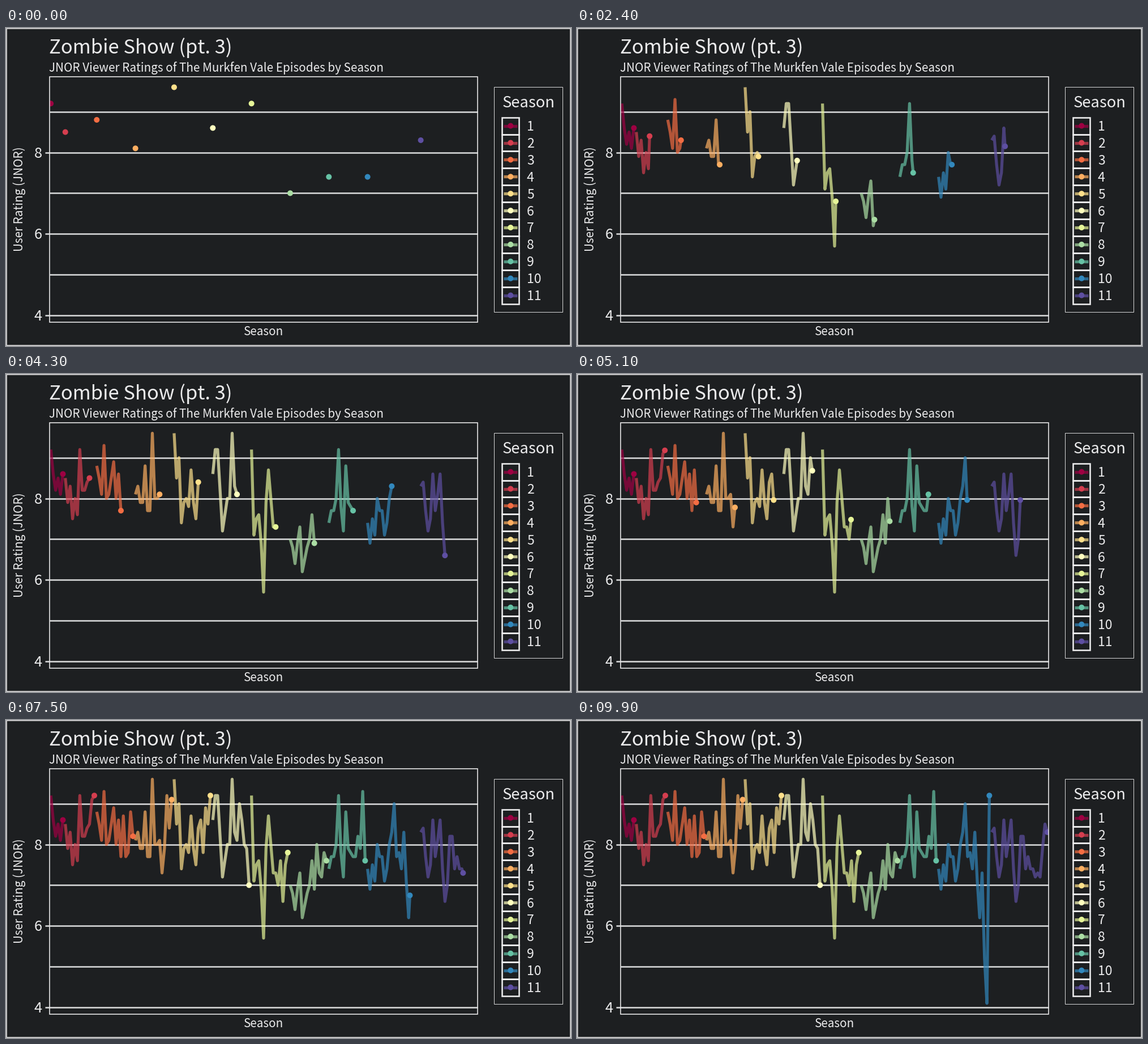
Recreate the animation shown at these times as a matplotlib script. Size 998 by 561 pixels, loop 10000 ms.

```python
import numpy as np
import matplotlib.pyplot as plt
from matplotlib.animation import FuncAnimation
from matplotlib.patches import Circle, Rectangle

W, H, DPI = 998, 561, 64
FRAMES, INTERVAL = 100, 100
BG, INK, GRID = "#1d1f21", "#ebebec", "#d6d7d8"
LEFT, TOP, RIGHT, BOTTOM = 77, 85.5, 833, 518.5
EPISODES = 177
LONGEST = 24
LINE_W, DOT_R, ALPHA = 5.2, 5, 0.7

plt.rcParams["font.family"] = ["Noto Sans CJK JP", "DejaVu Sans"]


def pt(px):
    return px * 72 / DPI


def x_pos(episode):
    return LEFT + (episode + 0.5) * (RIGHT - LEFT) / EPISODES


def y_pos(rating):
    return 219.5 + (8 - rating) * 71.87


fig = plt.figure(figsize=(W / DPI, H / DPI), dpi=DPI, facecolor=BG)
ax = fig.add_axes([0, 0, 1, 1])
ax.set_xlim(0, W)
ax.set_ylim(H, 0)
ax.axis("off")


def box(x0, y0, x1, y1, width, z=5):
    ax.add_patch(Rectangle((x0, y0), x1 - x0, y1 - y0, fill=False, ec=INK,
                           lw=pt(width), zorder=z, joinstyle="miter"))


def stroke(xs, ys, color, width, z, **kw):
    return ax.plot(xs, ys, color=color, lw=pt(width), zorder=z,
                   solid_capstyle="butt", solid_joinstyle="round", **kw)[0]


def dot(x, y, color):
    return ax.add_patch(Circle((x, y), DOT_R, fc=color, lw=0, zorder=4))


def label(x, y, text, size, **kw):
    ax.text(x, y, text, size=pt(size), color=INK, va="baseline", **kw)


# Panel
panel = Rectangle((LEFT, TOP), RIGHT - LEFT, BOTTOM - TOP,
                  transform=ax.transData)
for rating in range(4, 10):
    y = y_pos(rating)
    stroke([LEFT, RIGHT], [y, y], GRID, 2.6, 1)
    if rating % 2 == 0:
        stroke([69.5, LEFT], [y, y], GRID, 2.6, 1)
        label(64, y + 9, str(rating), 25.5, ha="right")
box(LEFT, TOP, RIGHT, BOTTOM, 1.6)
box(0.5, 0.5, W - 0.8, H - 0.8, 1.6)

# Titles
label(76.5, 45, "Zombie Show (pt. 3)", 34.6)
label(76.5, 76.5, "JNOR Viewer Ratings of The Murkfen Vale Episodes by Season",
      20.7)
label(455, 542, "Season", 20.6, ha="center")
label(30, 302, "User Rating (JNOR)", 20.7, ha="center", rotation=90,
      rotation_mode="anchor")

# Legend
box(862, 103.5, 983.5, 501, 0.9)
label(876.5, 140, "Season", 27.4)

seasons = []


def season(color, *ratings):
    """Add one season: its curve, its moving dot and its legend key."""
    start = sum(len(s["x"]) for s in seasons)
    xs = x_pos(start + np.arange(len(ratings)))
    ys = y_pos(np.array(ratings))
    line = stroke([], [], color, LINE_W, 3, alpha=ALPHA)
    head = dot(xs[0], ys[0], color)
    for artist in (line, head):
        artist.set_clip_path(panel)

    row = len(seasons)
    cy = 172.6 + 29.9 * row
    box(876.3, cy - 14.95, 906.4, cy + 14.95, 2.6, z=2)
    stroke([879.3, 903.4], [cy, cy], color, LINE_W, 3, alpha=ALPHA)
    dot(891.3, cy, color)
    label(920, cy + 8.4, str(row + 1), 23)
    seasons.append(dict(x=xs, y=ys, line=line, head=head))


season("#9E0142", 9.2, 8.6, 8.2, 8.5, 8.1, 8.6)
season("#D53E4F", 8.5, 7.9, 8.3, 7.5, 8.0, 7.6, 9.2, 8.2, 8.2, 8.4, 8.5,
       9.1, 9.2)
season("#F46D43", 8.8, 8.5, 8.1, 9.3, 8.0, 8.1, 8.5, 8.9, 8.0, 8.6, 7.7,
       8.7, 7.7, 7.8, 8.8, 8.2)
season("#FDAE61", 8.1, 8.3, 7.9, 7.9, 8.8, 7.7, 7.7, 9.6, 8.0, 8.0, 8.1,
       7.3, 7.9, 9.2, 8.4, 9.1)
season("#FEE08B", 9.6, 8.5, 9.0, 7.4, 7.9, 8.0, 7.8, 8.7, 7.9, 7.5, 8.4,
       8.6, 7.8, 8.9, 8.5, 9.2)
season("#FFFFBF", 8.6, 9.2, 9.2, 8.2, 7.2, 7.6, 8.0, 8.0, 9.6, 8.3, 8.1,
       9.0, 8.6, 8.0, 7.9, 7.0)
season("#E6F598", 9.2, 7.1, 7.5, 7.6, 6.9, 5.7, 7.9, 8.7, 8.0, 7.3, 7.3,
       7.0, 7.6, 6.6, 7.5, 7.8)
season("#ABDDA4", 7.0, 6.8, 6.4, 6.9, 7.3, 6.2, 6.5, 6.8, 7.0, 7.6, 6.9,
       8.0, 7.3, 7.2, 7.8, 7.6)
season("#66C2A5", 7.4, 7.7, 7.7, 8.0, 9.2, 7.8, 7.2, 8.8, 7.9, 7.8, 7.7,
       7.7, 8.2, 7.9, 9.3, 7.6)
season("#3288BD", 7.4, 6.9, 7.5, 7.1, 8.0, 7.7, 7.7, 7.1, 7.4, 8.0, 8.3,
       9.0, 7.7, 7.8, 7.4, 8.3, 7.1, 6.2, 7.3, 5.2, 4.1, 9.2)
season("#5E4FA2", 8.3, 8.4, 7.7, 7.2, 7.5, 8.6, 7.7, 8.1, 8.6, 7.4, 6.6,
       7.0, 8.2, 8.2, 7.4, 7.7, 7.4, 7.4, 7.2, 7.3, 7.2, 7.9, 8.5, 8.3)

# Each episode is reached on a whole frame, with linear motion in between.
steps = np.arange(LONGEST)
keys = np.round(steps * (FRAMES - 1) / (LONGEST - 1))


def update(frame):
    progress = np.interp(frame, keys, steps)
    artists = []
    for s in seasons:
        n = len(s["x"])
        t = min(progress, n - 1)
        done = int(t) + 1
        idx = np.arange(n)
        x, y = np.interp(t, idx, s["x"]), np.interp(t, idx, s["y"])
        xs, ys = list(s["x"][:done]), list(s["y"][:done])
        if t > done - 1:
            xs.append(x)
            ys.append(y)
        s["line"].set_data(xs, ys)
        s["head"].center = (x, y)
        artists += [s["line"], s["head"]]
    return artists


anim = FuncAnimation(fig, update, frames=FRAMES, interval=INTERVAL,
                     init_func=lambda: update(0), repeat=True)
plt.show()
```
